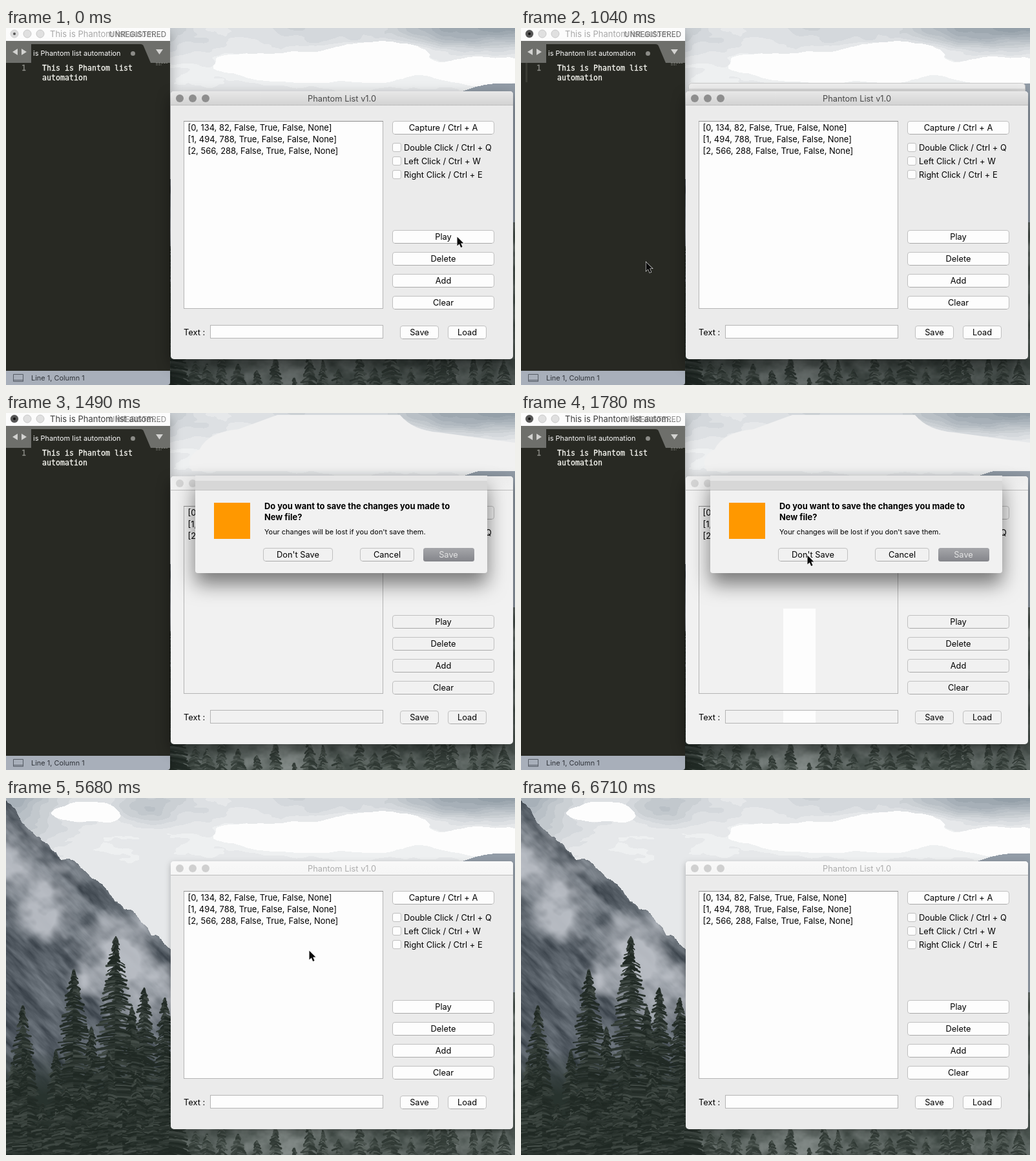
Write an HTML page with a canvas that moves like this. It is 788 by 553 pixels and loops after 7290 ms.

```html
<!DOCTYPE html>
<html lang="en">
<head>
<meta charset="utf-8">
<title>Phantom List</title>
<style>
  html, body { margin: 0; width: 100%; height: 100%; overflow: hidden; background: #777; }
  canvas, svg { position: absolute; left: 0; top: 0; width: 788px; height: 553px; }
  text { font: 12.85px Inter, "Open Sans", sans-serif; white-space: pre; }
  .mid { text-anchor: middle; }
  .small { font-size: 10.95px; }
  .row { font-size: 12.95px; }
  .bold { font-weight: 700; font-size: 12.9px; }
  .mono { font: 11.63px "DejaVu Sans Mono", monospace; fill: #f8f8f2; stroke: #f8f8f2; stroke-width: .3px; }

  svg { --face: #ebebeb; --field: #fdfdfd; --bar1: #e8e8e8; --bar2: #d2d2d2;
        --light: #8e8e8e; --title: #484848; --doc: #a8a8a8; --stamp: #666; }
  .asking { --face: #f1f1f1; --field: #f1f1f1; --bar1: #ededed; --bar2: #f1f1f1;
            --light: #d4d4d4; --title: #bbb; --doc: #3c3c3c; --stamp: #8a8a8a; }
  .idle { --bar1: #f9f9f9; --bar2: #f5f5f5; --light: #d0d0d0; --title: #adadad; }
  .idle .editor, svg:not(.asking) .sheet { display: none; }

  .editor { filter: drop-shadow(0 6px 9px rgba(0,0,0,.3)); }
  .window { filter: drop-shadow(0 9px 11px rgba(0,0,0,.42)); }
  .idle .window { filter: drop-shadow(0 3px 5px rgba(0,0,0,.25)); }
  .sheet { filter: drop-shadow(0 17px 15px rgba(0,0,0,.5)); }
  .face { fill: var(--face); }
  .field { fill: var(--field); stroke: #b4b4b4; }
  .button { fill: var(--field); stroke: #c0c0c0; }
  .edge { stroke: #a9a9a9; }
  .light { fill: var(--light); }
</style>
</head>
<body>
<canvas id="scene" width="788" height="553"></canvas>
<svg id="ui" viewBox="0 0 788 553"></svg>
<script>
const LOOP = 7290, FRAME = 148, W = 788, H = 553;
const ctx = document.getElementById('scene').getContext('2d');
const ui = document.getElementById('ui');

// ---------- landscape ----------
let seed = 7;
const random = () => (seed = (seed * 16807) % 2147483647) / 2147483647;
const between = (a, b) => a + (b - a) * random();
const clamp = v => Math.max(0, Math.min(1, v));
const mix = (a, b, k) => a.map((v, i) => v + (b[i] - v) * k);
const bump = (x, y, cx, cy, rx, ry) => Math.exp(-(((x - cx) / rx) ** 2) - ((y - cy) / ry) ** 2);

function lattice(x, y) {
  const s = Math.sin(x * 127.1 + y * 311.7) * 43758.5453;
  return s - Math.floor(s);
}

function noise(x, y) {
  const i = Math.floor(x), j = Math.floor(y);
  const [u, v] = [x - i, y - j].map(f => f * f * (3 - 2 * f));
  const top = lattice(i, j) * (1 - u) + lattice(i + 1, j) * u;
  const bottom = lattice(i, j + 1) * (1 - u) + lattice(i + 1, j + 1) * u;
  return top * (1 - v) + bottom * v;
}

// Four octaves of noise, 0 to 1.
function fbm(x, y) {
  let sum = 0;
  for (let o = 0; o < 4; o++) sum += noise(x * 2 ** o + o * 17, y * 2 ** o) / 2 ** o;
  return sum / 1.875;
}

function skyColor(x, y) {
  const wave = fbm(x / 90, y / 36) - .5;
  const glow = bump(x, y, 115, 22, 62, 18) + bump(x, y, 435, 60, 125, 24) +
               bump(x, y, 575, 50, 60, 30) + bump(x, y, 745, 68, 75, 21);
  const gloom = bump(x, y, 740, 0, 120, 32) + bump(x, y, 220, 18, 55, 26) * .6 + bump(x, y, 20, 25, 45, 50) * .7;
  const tone = 216 + 17 * clamp(y / 80) + wave * 50 * clamp(1.3 - y / 110) - 48 * gloom + 18 * glow;
  const v = glow + wave * .8 > .45 ? 253 : Math.min(244, Math.round(tone / 8) * 8);
  const tint = (253 - v) / 60;
  return [v - 7 * tint, v, v + 6 * tint];
}

const ridge = x => .92 * x + (x < 110 ? 19 * Math.sin(Math.PI * x / 110) : 0) + (fbm(x / 14, 3) - .5) * 22;

function mountainColor(x, y) {
  const tone = 48 + 95 * fbm((x + y) / 55, (x - y) / 13);
  const band = 1 - Math.abs(y - 118 - .72 * x) / 88;
  const fog = clamp(band * .8 + (fbm(x / 60 + 5, y / 48) - .5) * 2.2);
  return mix([tone - 7, tone + 1, tone + 9], [190, 194, 201], fog * .92);
}

function mistColor(x, y) {
  const k = fbm(x / 24, y / 20) * .75 + bump(x, y, 435, 525, 60, 60) * .35;
  return mix([42, 52, 47], [152, 159, 157], clamp(k));
}

function landColor(x, y) {
  if (x < 255) return y > ridge(x) ? mountainColor(x, y) : skyColor(x, y);
  if (y > 300) return mistColor(x, y);
  return x > 700 && y > 85 + ((770 - x) / 18) ** 2 ? [146, 156, 167] : skyColor(x, y);
}

function tree(x, top, halfWidth, bottom, dark, range) {
  ctx.lineCap = 'round';
  for (let y = top; y < bottom; y += 2) {
    const reach = halfWidth * ((y - top) / (bottom - top)) ** .65;
    for (const side of [-1, 1]) {
      const k = dark + range * random() ** 2;
      const tip = x + side * (1 + reach * between(.2, 1.15));
      ctx.strokeStyle = `rgb(${k},${k + 9},${k + 4})`;
      ctx.lineWidth = between(1.5, 4);
      ctx.beginPath();
      ctx.moveTo(x, y);
      ctx.quadraticCurveTo((x + tip) / 2, y, tip, y + between(1, 6));
      ctx.stroke();
    }
  }
}

function drawLandscape() {
  const image = ctx.createImageData(W, H);
  for (let y = 0, p = 0; y < H; y++)
    for (let x = 0; x < W; x++, p += 4) image.data.set([...landColor(x, y), 255], p);
  ctx.putImageData(image, 0, 0);

  for (let x = 262; x < W; x += between(16, 34))
    tree(x, between(485, 535) + 14 * bump(x, 0, 435, 0, 50, 1), between(12, 26), 600, 48, 45);

  const shadow = ctx.createLinearGradient(0, 390, 0, 460);
  shadow.addColorStop(0, 'rgba(40,51,46,0)');
  shadow.addColorStop(1, 'rgb(40,51,46)');
  ctx.fillStyle = shadow;
  ctx.fillRect(0, 390, 255, 163);
  for (const [x, top] of [[246, 311], [214, 295], [195, 325], [132, 355], [170, 215], [105, 267], [26, 323]])
    tree(x, top, (H - top) * .135, H, 31, 38);
  for (let x = -5; x < 260; x += between(14, 26))
    tree(x, between(390, 480), between(20, 34), 575, 32, 36);
}

// ---------- interface ----------
const rect = (x, y, w, h, attrs) => `<rect x="${x}" y="${y}" width="${w}" height="${h}" ${attrs}/>`;
const label = (x, y, text, attrs = '') => `<text x="${x}" y="${y}" ${attrs}>${text}</text>`;
const button = (x, y, w, text) =>
  rect(x + .5, y + .5, w - 1, 20, 'rx="3.5" class="button"') +
  `<path d="M${x + 4} ${y + 20.5}h${w - 8}" class="edge"/>` +
  label(x + w / 2, y + 15, text, 'class="mid"');
const checkbox = (y, text) =>
  rect(598.5, y + .5, 13, 13, 'rx="2.5" class="button"') + label(616, y + 12, text);
const lights = (x, y, attrs) =>
  [0, 20, 40].map(dx => `<circle cx="${x + dx}" cy="${y}" r="6" ${attrs}/>`).join('');

const editor = `<g class="editor">
  <path d="M0 0H254V549q0 4-4 4H0z" fill="#282923"/>
  ${rect(0, 0, 254, 20, 'fill="#fcfcfc"')}
  ${lights(13, 9, 'fill="#e0e0e0" stroke="#c8c8c8"')}
  <circle id="close" cx="13" cy="9" r="6"/><circle cx="13" cy="9" r="2" id="dot"/>
  ${label(68, 14, 'This is Phantom list autom…', 'style="font-size:13px;fill:var(--doc)"')}
  ${label(248, 14, 'UNREGISTERED', 'text-anchor="end" style="font-size:11.6px;fill:var(--stamp)"')}
  ${rect(0, 20, 254, 34, 'fill="#6e6f6b"')}
  <path d="M39 54V25H208q4 0 5 3L224 54z" fill="#282923"/>
  <path d="M18 32v10l-8-5zM24 32v10l8-5zM232 33h11l-5.500 8z" fill="#d2d2d0"/>
  ${label(42, 43, 'is Phantom list automation', 'class="small" fill="#fff"')}
  <circle cx="196.500" cy="39.500" r="3.500" fill="#8b8b87"/>
  ${rect(7, 54, 3, 30, 'id="gutter" fill="#3a3b34"')}
  ${label(24, 66, '1', 'class="mono" style="fill:#8f908a;stroke:#8f908a"')}
  ${label(56, 66, 'This is Phantom list', 'class="mono"')}
  ${label(56, 81, 'automation', 'class="mono"')}
  <path d="M232 54.500h18M232 57h9" stroke="#777872" stroke-dasharray="3 1"/>
  <path d="M0 531H254V549q0 4-4 4H0z" fill="#a8afba"/>
  <path d="M11.500 536.500h15v11h-15zM12 545.500h14" fill="none" stroke="#555b64"/>
  ${label(39, 546, 'Line 1, Column 1', 'class="small" fill="#30343a"')}
</g>`;

const mainWindow = `<g class="window">
  ${rect(255, 98, 530, 415, 'rx="5" class="face"')}
  <path d="M255 120V103q0-5 5-5H780q5 0 5 5V120z" fill="url(#bar)"/>
  <path d="M255 119.500H785" stroke="#bdbdbd"/>
  ${lights(269, 109, 'class="light"')}
  ${label(520, 114, 'Phantom List v1.0', 'class="mid" style="fill:var(--title)"')}
  ${rect(275.5, 144.5, 308, 290, 'class="field"')}
  <path d="M275 144.500H584" stroke="#8f8f8f"/>
  ${['[0, 134, 82, False, True, False, None]',
     '[1, 494, 788, True, False, False, None]',
     '[2, 566, 288, False, True, False, None]'].map((row, i) => label(281.5, 159 + 18 * i, row, 'class="row"')).join('')}
  ${button(598, 144, 158, 'Capture / Ctrl + A')}
  ${['Double Click / Ctrl + Q', 'Left Click / Ctrl + W', 'Right Click / Ctrl + E']
    .map((name, i) => checkbox(178 + 21 * i, name)).join('')}
  ${['Play', 'Delete', 'Add', 'Clear'].map((name, i) => button(598, 313 + 34 * i, 158, name)).join('')}
  ${label(275, 476, 'Text :')}
  ${rect(316.5, 460.5, 267, 20, 'class="field"')}
  ${button(610, 461, 60, 'Save')}${button(684, 461, 60, 'Load')}
  <path id="refresh" d="M406 303h50v131h-50zM406 461h50v19h-50z" fill="#fdfdfd"/>
</g>`;

const sheet = `<g class="sheet">
  <path d="M293 97H745V244q0 4-4 4H297q-4 0-4-4z" fill="#f1f1f1"/>
  ${rect(293, 97, 452, 8, 'fill="#e6e6e6"')}${rect(293, 105, 452, 14, 'fill="#d7d7d7"')}
  <path d="M293 119.500H745" stroke="#c4c4c4"/>
  ${rect(322, 139, 56, 56, 'fill="#ff9800"')}
  ${label(400, 149, 'Do you want to save the changes you made to', 'class="bold"')}
  ${label(400, 166, 'New file?', 'class="bold"')}
  ${label(400, 188, "Your changes will be lost if you don't save them.", 'class="small"')}
  ${button(398, 209, 108, "Don't Save")}${button(548, 209, 84, 'Cancel')}
  ${rect(646, 209, 79, 21, 'rx="3.5" fill="url(#press)"')}
  ${label(685, 224, 'Save', 'class="mid" fill="#e4e4e4"')}
</g>`;

ui.innerHTML = `<defs>
  <linearGradient id="bar" x2="0" y2="1">
    <stop style="stop-color:var(--bar1)"/><stop offset="1" style="stop-color:var(--bar2)"/>
  </linearGradient>
  <linearGradient id="press" x2="0" y2="1">
    <stop stop-color="#a5a6aa"/><stop offset="1" stop-color="#84858a"/>
  </linearGradient></defs>
  <path id="haze" d="M288 90q-12-22 12-34q12-26 60-31l60-22H610q20 24 60 27l118 16V90z" fill="#f1f1f1"/>
  <path id="dusk" d="M255 513H788V553H255z" fill="#111614" opacity=".25"/>
  ${editor}
  <g id="ghost">${rect(259.5, 85.5, 521, 30, 'rx="5" fill="#eeeeee" stroke="#c9c9c9"')}
    ${rect(260, 94, 520, 5, 'fill="#d9d9d9"')}</g>
  ${mainWindow}${sheet}
  <path id="pointer" d="M.5.5V14.500L3.800 11.400 6.200 17 8.600 16 6.200 10.500H10.500z"
    fill="#0a0a0a" stroke="#fff" stroke-width="1.100" paint-order="stroke"/>`;

// ---------- timeline ----------
// Scripted glides run straight between click points; the hand then leads the pointer away.
const play = [698, 323], close = [13, 9], below = [373, 715], answer = [444, 215];
const hand = [[469, 236], [553, 327], [593, 399], [666, 514], [665, 518], [681, 521], [729, 548], below];

const framesSince = (t, start) => Math.floor((t - start) / FRAME);
const glide = (from, to, t, start, lead) => mix(from, to, clamp(lead + framesSince(t, start) / 2)).map(Math.round);

function pointerAt(t) {
  if (t < 446) return play;
  if (t < 1038) return glide(play, close, t, 446, .25);
  if (t < 1630) return glide(close, below, t, 1038, .5);
  if (t < 5670) return glide(below, answer, t, 1630, .49);
  return hand[Math.min(framesSince(t, 5670), hand.length - 1)];
}

const part = id => document.getElementById(id);
const show = (id, visible) => part(id).style.display = visible ? '' : 'none';

function render(t) {
  const within = (from, to) => t >= from && t < to;
  ui.setAttribute('class', t < 1490 ? 'editing' : t < 1930 ? 'asking' : 'idle');
  part('pointer').setAttribute('transform', `translate(${pointerAt(t)})`);
  part('close').setAttribute('fill', t < 750 ? '#dcdcdc' : t < 890 ? '#b5b5b5' : '#555');
  part('dot').setAttribute('fill', t < 890 ? '#555' : '#111');
  show('gutter', within(750, 1490));
  show('ghost', within(1040, 1190));
  show('dusk', t < 1340);
  show('haze', within(1490, 1930));
  show('refresh', within(1780, 1930));
}

drawLandscape();
const began = performance.now();
function tick() {
  render((performance.now() - began) % LOOP);
  requestAnimationFrame(tick);
}
tick();
</script>
</body>
</html>
```
